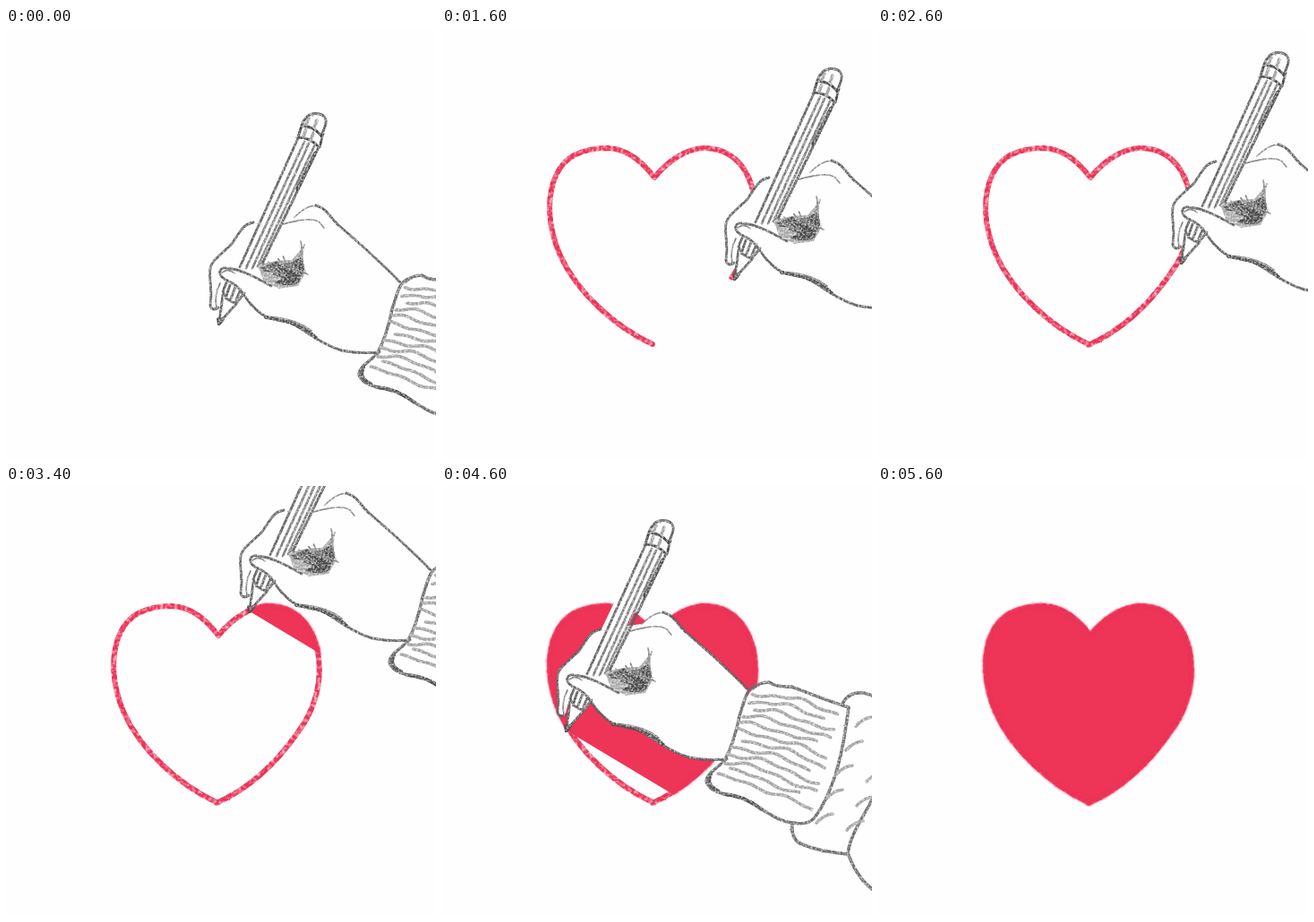
Write an HTML page that moves like this. It is 480 px wide and 480 px high and loops after 6.4 s.

```html
<!DOCTYPE html>
<html lang="en">
<head>
<meta charset="utf-8">
<title>Drawing a heart</title>
<style>
  html, body { margin: 0; width: 100%; height: 100%; overflow: hidden; background: #fefefe; }
  svg { display: block; width: 100vw; height: 100vh; }
  path { stroke-linecap: round; stroke-linejoin: round; }
  .line path { fill: none; stroke: #606060; stroke-width: 2.9; }
  .line .dark { stroke: #424242; }
  .line .thin { stroke: #808080; stroke-width: 1.7; }
  .line .soft { stroke: #a0a0a0; stroke-width: 3.6; }
  .line .stripe { stroke: #7a7a7a; stroke-width: 2.8; }
  .line .wide { stroke: #505050; stroke-width: 4; }
  .line .cloth { stroke: #6c6c6c; stroke-width: 3.6; }
  .line .shade { fill: #454545; stroke: none; }
  .line .wash { fill: #a8a8a8; stroke: none; }
  .paper { fill: #fefefe; }
  .red { stroke: #ec3357; stroke-width: 6; }
</style>
</head>
<body>
<svg viewBox="0 0 480 480">
  <defs>
    <filter id="pencil" filterUnits="userSpaceOnUse" x="200" y="80" width="530" height="500" color-interpolation-filters="sRGB">
      <feTurbulence type="fractalNoise" baseFrequency=".45" numOctaves="2" seed="4" result="n"/>
      <feColorMatrix in="n" values="0 0 0 0 0  0 0 0 0 0  0 0 0 0 0  0 0 0 1.8 -.08" result="grain"/>
      <feDisplacementMap in="SourceGraphic" in2="n" scale="1.6" xChannelSelector="R" yChannelSelector="G"/>
      <feGaussianBlur stdDeviation=".55" result="d"/>
      <feComposite in="d" in2="grain" operator="in"/>
    </filter>
    <filter id="crayon" filterUnits="userSpaceOnUse" x="100" y="115" width="270" height="260" color-interpolation-filters="sRGB">
      <feTurbulence type="fractalNoise" baseFrequency=".25" numOctaves="3" seed="9" result="n"/>
      <feColorMatrix in="n" values="0 0 0 0 0  0 0 0 0 0  0 0 0 0 0  0 0 0 1.8 -.05" result="grain"/>
      <feDisplacementMap in="SourceGraphic" in2="n" scale="1.6" xChannelSelector="R" yChannelSelector="G"/>
      <feGaussianBlur stdDeviation=".7" result="d"/>
      <feComposite in="d" in2="grain" operator="in"/>
    </filter>
    <filter id="rough" filterUnits="userSpaceOnUse" x="100" y="115" width="270" height="260" color-interpolation-filters="sRGB">
      <feTurbulence type="fractalNoise" baseFrequency=".5" numOctaves="2" seed="2" result="n"/>
      <feDisplacementMap in="SourceGraphic" in2="n" scale="3" xChannelSelector="R" yChannelSelector="G"/>
      <feGaussianBlur stdDeviation=".8"/>
    </filter>
    <clipPath id="front"><path id="edge"/></clipPath>
  </defs>

  <g filter="url(#crayon)">
    <path id="outline" class="red" fill="none" d="M235 353C190 332 150 293 132 254C118 222 116 188 128 163C140 138 165 134 185 134C208 135 224 150 237 167C250 151 270 135 292 134C322 134 341 153 348 185C354 218 345 250 325 276C300 312 270 338 235 354"/>
  </g>
  <g clip-path="url(#front)">
    <path id="fill" class="red" fill="#ee3557" filter="url(#rough)"/>
  </g>

  <g id="hand">
    <g class="paper">
      <path d="M276 217L265 221 252 241 229 262 227 272 229 311 236 314 243 288 262 292 272 307 290 323 315 328 350 350 375 361 416 364 440 284 406 250 372 221 358 206 347 198 337 199 322 211Z"/>
      <path d="M329 108C333 95 342 93 354 98C359 102 356 112 352 121L263 302 238 330 241 292Z"/>
      <path d="M446 283L464 276 489 281 546 302 554 289 569 288 720 322 720 570 579 510 552 468 524 464 501 457 489 433 484 433 459 419 434 404 404 398 394 387 399 376 414 364 437 294Z"/>
    </g>
    <g class="line" filter="url(#pencil)">
      <!-- pencil -->
      <path d="M330 109C334 97 341 94 350 96C358 98 358 105 356 110L352 121"/>
      <path d="M330 109Q342 109 352 120M326 122Q340 122 349 133M330 109L326 122M354 118L350 133" class="dark"/>
      <path d="M338 101L335 108M347 103L344 111M335 113L332 121M343 117L340 126" class="soft"/>
      <path d="M326 123L261 267M349 133L286 263"/>
      <path d="M333 127L268 268M338 129L275 268M344 132L281 266" class="stripe"/>
      <path d="M345 140L325 180" class="wide"/>
      <path d="M247 282L242 294Q246 304 250 304Q255 310 262 301L266 296M250 287L246 299M256 289L251 302M262 292L257 303"/>
      <path d="M242 298L238 329 258 307"/>
      <path d="M237 325L238 330 242 325" class="wide dark"/>
      <!-- fingers -->
      <path d="M276 217C264 219 262 227 252 241C240 253 230 259 228 268C226 280 231 293 228 309C229 315 233 315 237 312"/>
      <path d="M239 285Q232 298 235 312" class="thin"/>
      <path d="M296 288C280 279 262 269 246 268C236 267 237 276 245 281C262 288 263 296 273 308C285 321 291 325 315 328C332 335 350 353 375 360Q395 364 417 362"/>
      <path d="M241 273Q249 268 255 274" class="thin"/>
      <path d="M290 323Q310 325 325 332T346 346" class="wide"/>
      <path d="M300 323Q325 325 341 338" class="thin"/>
      <path d="M309 219C322 216 340 210 350 217L355 223M322 211C336 198 344 196 352 201" class="thin"/>
      <path d="M346 198C358 201 361 211 372 221C392 238 418 261 440 284"/>
      <!-- palm shadow -->
      <path class="wash" d="M281 265Q302 258 319 259L333 243 331 260 335 272 326 288 304 291 287 281Z"/>
      <path class="shade" d="M284 268L303 260 306 264 318 262 331 255 333 270 326 285Q315 290 300 284L309 279 297 275 304 272 289 272Z"/>
      <g id="hatch"></g>
      <!-- cuff and sleeve -->
      <path class="cloth" d="M452 279C438 283 437 296 431 314C427 334 422 350 414 364C404 374 395 377 394 387C400 403 424 400 440 408C460 420 475 432 491 433Q508 436 515 427C535 400 545 360 550 325L553 304C535 299 505 287 489 281Q473 282 464 276Q453 276 446 283"/>
      <path d="M399 379Q393 390 407 397M414 401Q435 402 456 418" class="wide"/>
      <g id="knit"></g>
      <path class="cloth" d="M546 300Q553 286 570 288L586 293 720 322M490 433Q488 452 501 457Q520 465 552 468M579 407C570 426 555 445 552 467C560 488 572 505 588 512L720 570"/>
      <g id="folds"></g>
    </g>
  </g>
</svg>
<script>
  const STEP = 200, LOOP = 6400, LAST = 28, SLOPE = 0.6;
  const $ = id => document.getElementById(id);
  const outline = $('outline'), length = outline.getTotalLength();

  // pencil tip at each step
  const tips = [
    [238, 330], [169, 307], [128, 243], [146, 142], [225, 157], [274, 139], [335, 154],
    [350, 212], [327, 280], [301, 307], [271, 333], [239, 353], [295, 305], [339, 262],
    [347, 186], [303, 134], [339, 158], [272, 140], [350, 214], [192, 136], [330, 271],
    [128, 202], [297, 314], [139, 273], [236, 354], [290, 385], [360, 430], [440, 475]
  ];
  const FILL_START = 15, FILL_END = 24, OUTLINE_END = 11;

  function addLine(group, d, cls) {
    const p = document.createElementNS('http://www.w3.org/2000/svg', 'path');
    p.setAttribute('d', d);
    p.setAttribute('class', cls);
    $(group).append(p);
  }

  // short strokes fanning out of the palm shadow
  for (let i = 0; i < 9; i++) {
    const x = 288 + i * 4.5, y = 266 + 3 * Math.sin(i);
    addLine('hatch', `M${x} ${y}l${9 + i % 3 * 2} ${6 + i % 4}`, 'thin dark');
    addLine('hatch', `M${x + 2} ${y}l${i - 8} ${-4 - i % 3 * 2}`, 'thin');
  }
  addLine('hatch', 'M333 242Q327 253 332 265M329 238Q332 247 326 257', 'thin');

  // wavy ribs of the cuff
  const RIBS = 12;
  for (let i = 0; i < RIBS; i++) {
    const v = (i + 0.5) / RIBS;
    const x0 = 444 - 42 * v, y0 = 284 + 100 * v, x1 = 547 - 31 * v, y1 = 308 + 119 * v;
    const from = i % 4 === 2 ? 0.12 : 0.03, to = i % 3 === 1 ? 0.84 : 0.97;
    let d = '';
    for (let u = from; u <= to; u += 0.04) {
      const wave = 2 * Math.sin(u * 9 + i * 0.9) + 1.3 * Math.sin(u * 19 + i * 2.1);
      const x = x0 + (x1 - x0) * u;
      const y = y0 + (y1 - y0) * u + wave - 5 * Math.sin(u * Math.PI);
      d += (d ? 'L' : 'M') + x.toFixed(1) + ' ' + y.toFixed(1);
    }
    addLine('knit', d, 'soft');
  }

  // loose marks on the sleeve
  for (let i = 0; i < 15; i++) {
    const row = i % 5, col = Math.floor(i / 5);
    const x = 561 - row * 11 + col * 34, y = 325 + row * 27 + col * 8;
    addLine('folds', `M${x} ${y}q8 -9 18 -10`, 'soft');
  }

  function nearestLength([x, y]) {
    let best = 0, min = Infinity;
    for (let s = 0; s <= length; s += 1) {
      const p = outline.getPointAtLength(s), d = Math.hypot(p.x - x, p.y - y);
      if (d < min) { min = d; best = s; }
    }
    return best;
  }

  const drawn = tips.map((tip, k) =>
    k === 0 ? 0 : k < OUTLINE_END ? nearestLength(tip) : length + 1);
  $('fill').setAttribute('d', outline.getAttribute('d') + 'Z');

  // the filled part ends at a slanted line through the tip
  function fillLevel(k) {
    if (k < FILL_START) return -600;
    if (k >= FILL_END) return 600;
    return tips[k][1] - SLOPE * tips[k][0];
  }

  function show(k) {
    const ink = k < LAST ? drawn[k] : length + 1;
    outline.style.visibility = ink ? 'visible' : 'hidden';
    outline.setAttribute('stroke-dasharray', `${ink} ${length * 2}`);
    const c = fillLevel(k);
    $('edge').setAttribute('d', `M0 -900H480V${c + SLOPE * 480}L0 ${c}Z`);
    $('hand').style.display = k < LAST ? '' : 'none';
    if (k < LAST) {
      const [x, y] = tips[k];
      $('hand').setAttribute('transform', `translate(${x - tips[0][0]} ${y - tips[0][1]})`);
    }
  }

  const start = performance.now();
  let current = -1;
  function tick() {
    const k = Math.min(LAST, Math.floor((performance.now() - start) % LOOP / STEP));
    if (k !== current) show(current = k);
    requestAnimationFrame(tick);
  }
  tick();
</script>
</body>
</html>
```
